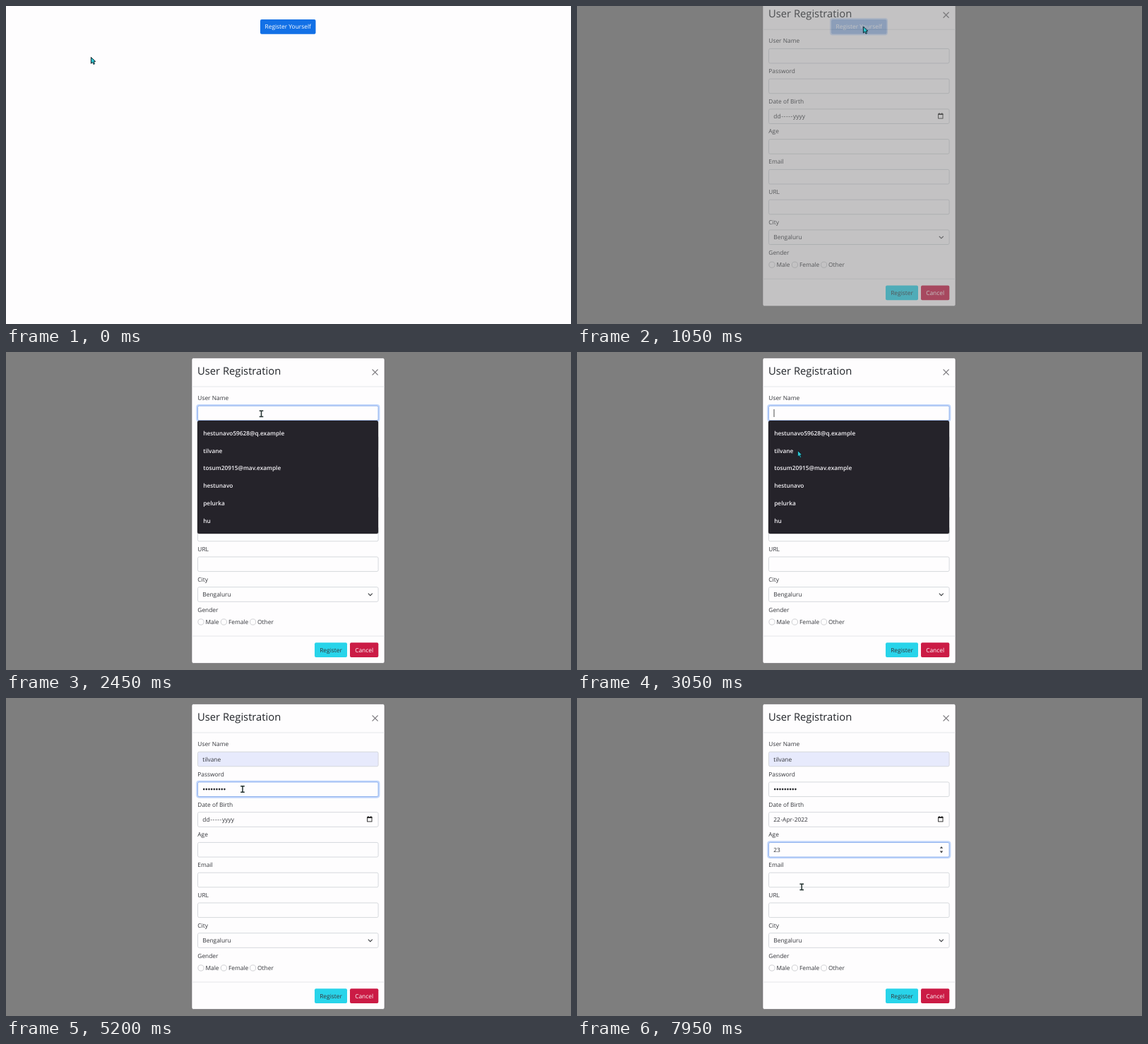
An HTML page for the animation above (8 s loop, 800 by 450 pixels).

```html
<!DOCTYPE html>
<html lang="en">
<head>
<meta charset="utf-8">
<title>User Registration</title>
<style>
  html, body { margin: 0; width: 100%; height: 100%; overflow: hidden; background: #fefdfe; }
  svg { display: block; width: 100vw; height: 100vh; }
  text { font: 8.4px "Open Sans", "Noto Sans", sans-serif; fill: #33353a; text-rendering: geometricPrecision; white-space: pre; }
  .title { font-size: 14.75px; font-weight: 500; fill: #212429; }
  .item { font-size: 8.3px; font-weight: 600; fill: #f4f2f6; }
  .light { fill: #fff; }
  .mid { text-anchor: middle; }
</style>
</head>
<body>
<svg id="stage" viewBox="0 0 800 450"></svg>
<script>
const LOOP = 8000;
const stage = document.getElementById('stage');

function add(parent, tag, attrs = {}, content = '') {
  const node = document.createElementNS('http://www.w3.org/2000/svg', tag);
  for (const key in attrs) node.setAttribute(key, attrs[key]);
  node.textContent = content;
  return parent.appendChild(node);
}
const group = parent => add(parent, 'g');
const rect = (parent, x, y, width, height, fill, extra) =>
  add(parent, 'rect', { x, y, width, height, fill, ...extra });
const label = (parent, x, y, content, cls = '') => add(parent, 'text', { x, y, class: cls }, content);
const path = (parent, d, stroke, width = 1, fill = 'none') =>
  add(parent, 'path', { d, stroke, fill, 'stroke-width': width });
const show = (node, on) => node.setAttribute('visibility', on ? 'visible' : 'hidden');

// Page
rect(stage, 0, 0, 800, 450, '#fefdfe');
const openRing = rect(stage, 359, 18, 80, 22.5, 'none', { rx: 3, stroke: '#8fbafa', 'stroke-width': 2 });
const openButton = rect(stage, 360, 19, 78.5, 20.7, '#1270e6', { rx: 2 });
label(stage, 399.2, 32.4, 'Register Yourself', 'light mid');
const backdrop = rect(stage, 0, 0, 800, 450, '#000');

// Dialog
const modal = group(stage);
rect(modal, 263, 8.5, 273, 432, '#fefdfe', { rx: 2.5, stroke: '#6c6a6d', 'stroke-width': .6 });
label(modal, 271, 32.2, 'User Registration', 'title');
path(modal, 'M518.6 24.6l8 8m0-8l-8 8', '#77757a', 1.2);
path(modal, 'M263.3 49H535.7M263.3 402H535.7', '#dee0e4', .8);

const fieldTop = row => 76.2 + row * 42.75;
const FIELD_H = 20.6;
const fields = ['User Name', 'Password', 'Date of Birth', 'Age', 'Email', 'URL', 'City'].map((name, row) => {
  const y = fieldTop(row);
  label(modal, 271.3, y - 8.2, name);
  const ring = rect(modal, 270.3, y - 1, 258, FIELD_H + 2, 'none',
    { rx: 3, stroke: '#c4d8fb', 'stroke-width': 2.2 });
  const box = rect(modal, 271.5, y, 255.6, FIELD_H, '#fefdfe', { rx: 2, 'stroke-width': .9 });
  return { y, ring, box };
});
const valueY = row => fieldTop(row) + 13.4;

const userValue = label(modal, 278.3, valueY(0), '');
const dots = Array.from({ length: 9 }, (_, i) =>
  add(modal, 'circle', { cx: 280.2 + i * 3.65, cy: 129.1, r: 1.3, fill: '#25272b' }));

const dayMark = rect(modal, 278.2, 166.2, 10, 11.2, '#1a78cf');
const emptyDate = group(modal);
const emptyDay = label(emptyDate, 278.3, valueY(2), 'dd');
label(emptyDate, 289.2, valueY(2), '-----').style.letterSpacing = '.65px';
label(emptyDate, 306, valueY(2), 'yyyy');
const fullDate = group(modal);
const fullDay = label(fullDate, 278.3, valueY(2), '22');
label(fullDate, 288.4, valueY(2), '-Apr-2022');
rect(modal, 511.6, 168.7, 6.4, 6.2, 'none', { stroke: '#222', 'stroke-width': .9 });
path(modal, 'M511.2 169.2h7.2M513 167.2v1.5m3.7-1.5v1.5', '#222', 1.4);

const ageValue = label(modal, 278.3, valueY(3), '');
const spinner = path(modal, 'M513.8 212.8l2.2-2.8 2.2 2.8zM513.8 216.6l2.2 2.8 2.2-2.8z', 'none', 0, '#3c3d40');
const caret = rect(modal, 278.6, 0, .8, 11, '#222');

label(modal, 278.3, valueY(6), 'Bengaluru');
path(modal, 'M512.8 341.6l3 3 3-3', '#3c3e42', 1.1);
label(modal, 271.3, 367.8, 'Gender');
[['Male', 276], ['Female', 308.4], ['Other', 349.6]].forEach(([name, x]) => {
  add(modal, 'circle', { cx: x, cy: 382, r: 4.1, fill: '#fefdfe', stroke: '#c3c4c8', 'stroke-width': .8 });
  label(modal, x + 6.5, 385.1, name);
});
rect(modal, 437, 411.2, 46, 20.8, '#28d4ea', { rx: 2 });
label(modal, 460, 424.9, 'Register', 'mid');
rect(modal, 487, 411.2, 40.3, 20.8, '#cb1b45', { rx: 2 });
label(modal, 507.1, 424.9, 'Cancel', 'mid light');

// Suggestions
const USER = 'tilvane';
const menu = group(modal);
rect(menu, 270.6, 97.4, 257, 160.4, '#000', { rx: 3, opacity: .25 });
rect(menu, 271, 97, 256, 160, '#25232a', { rx: 2.5 });
['hestunavo59628@q.example', USER, 'tosum20915@mav.example', 'hestunavo', 'pelurka', 'hu']
  .forEach((name, i) => label(menu, 279.2, 118 + i * 24.7, name, 'item'));

// Pointers
const arrow = path(stage, 'M.4 .5V9.4L2.5 7.5 4 10.6 5.6 9.8 4.2 6.9 6.8 6.6z', '#13252c', 1, '#2cc4cf');
const beam = path(stage, 'M-2.8-4.2H2.8M0-4.2V4.2M-2.8 4.2H2.8', '#22312f', 1.5);

// Pointer track: time, x, y
const TRACK = [
  [50, 120, 72], [330, 330, 90], [560, 482, 72], [810, 405, 28.7], [1750, 405, 28.7],
  [1930, 361.5, 87.4], [2620, 361.5, 87.4], [2920, 312, 139], [3150, 312, 139],
  [3500, 335, 129], [5250, 335, 129], [5620, 514, 171], [5850, 514, 171],
  [6250, 345, 270], [6450, 345, 270], [6700, 325, 214.5], [7600, 325, 214.5], [7900, 318.2, 267.4]
];
// Focus changes: time, row
const FOCUS = [[1950, 0], [3550, 1], [5650, 2], [6950, 3]];
const PASSWORD_START = 4200, KEY_GAP = 60;
const AGE_KEYS = [7200, 7420];
const PICK_USER = 3100, PICK_DATE = 6450, MENU_OPEN = 2050;

const progress = (t, start, length) => Math.min(1, Math.max(0, (t - start) / length));

function pointerAt(t) {
  const next = TRACK.findIndex(point => point[0] > t);
  if (next === 0) return TRACK[0].slice(1);
  if (next < 0) return TRACK[TRACK.length - 1].slice(1);
  const [t0, x0, y0] = TRACK[next - 1], [t1, x1, y1] = TRACK[next];
  const p = (t - t0) / (t1 - t0), e = p * p * (3 - 2 * p);
  return [x0 + (x1 - x0) * e, y0 + (y1 - y0) * e];
}

function render(t) {
  const [x, y] = pointerAt(t);
  const [focusTime, focused] = FOCUS.filter(f => f[0] <= t).pop() || [0, -1];
  const menuOpen = t >= MENU_OPEN && t < PICK_USER;

  const overButton = x > 360 && x < 438 && y > 19 && y < 39;
  openButton.setAttribute('fill', overButton ? '#0d5fd4' : '#1270e6');
  show(openRing, t >= 850);
  backdrop.setAttribute('opacity', .5 * progress(t, 860, 150));
  modal.setAttribute('opacity', progress(t, 970, 150));
  const drop = -27 * Math.pow(1 - progress(t, 970, 300), 1.7);
  modal.setAttribute('transform', `translate(0 ${drop})`);

  fields.forEach((field, row) => {
    const active = row === focused;
    show(field.ring, active);
    field.box.setAttribute('stroke', active ? '#83a9ec' : '#d2d5da');
    if (row === 0) field.box.setAttribute('fill', t >= PICK_USER ? '#e7eafc' : '#fefdfe');
  });

  userValue.textContent = t >= PICK_USER ? USER : '';
  const typed = t < PASSWORD_START ? 0 : Math.min(9, 1 + Math.floor((t - PASSWORD_START) / KEY_GAP));
  dots.forEach((dot, i) => show(dot, i < typed));

  show(emptyDate, t < PICK_DATE);
  show(fullDate, t >= PICK_DATE);
  show(dayMark, focused === 2);
  const dayFill = focused === 2 ? '#fff' : '#33353a';
  emptyDay.style.fill = fullDay.style.fill = dayFill;

  const digits = AGE_KEYS.filter(key => key <= t).length;
  ageValue.textContent = '23'.slice(0, digits);

  const overField = fields.slice(0, 6).findIndex(f => y > f.y && y < f.y + FIELD_H);
  show(spinner, focused === 3 || (t > 1100 && overField === 3 && !menuOpen));
  show(menu, menuOpen);

  // The caret blinks from the latest focus or key press.
  let lastInput = focusTime, caretX = 278.6;
  if (focused === 0 && t >= PICK_USER) { lastInput = PICK_USER; caretX = 305.5; }
  if (focused === 1 && typed) { lastInput = PASSWORD_START + (typed - 1) * KEY_GAP; caretX += typed * 3.65; }
  if (focused === 3 && digits) { lastInput = AGE_KEYS[digits - 1]; caretX += digits * 4.8; }
  caret.setAttribute('x', caretX);
  caret.setAttribute('y', fieldTop(Math.max(0, focused)) + 4.8);
  show(caret, focused >= 0 && focused !== 2 && Math.floor((t - lastInput) / 500) % 2 === 0);

  const textPointer = t > 1100 && overField >= 0 && x < 508 && !(menuOpen && y > 97);
  show(arrow, !textPointer);
  show(beam, textPointer);
  (textPointer ? beam : arrow).setAttribute('transform', `translate(${x} ${y})`);
}

const startTime = performance.now();
function tick() {
  render((performance.now() - startTime) % LOOP);
  requestAnimationFrame(tick);
}
tick();
</script>
</body>
</html>
```
